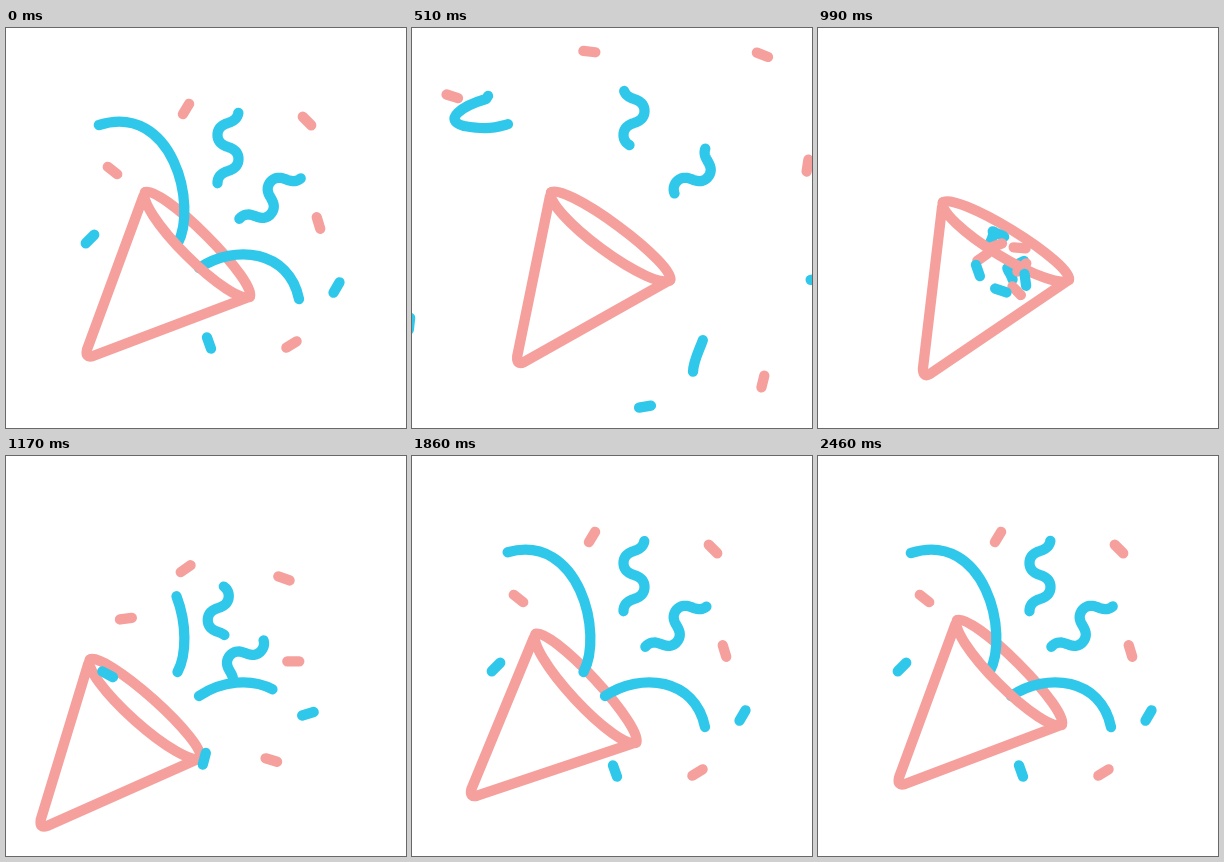
Write an HTML page that moves like this. It is 400 px wide and 400 px high and loops after 2.49 s.

```html
<!DOCTYPE html>
<html lang="en">
<head>
<meta charset="utf-8">
<title>Party popper</title>
<style>
html, body { margin: 0; width: 100%; height: 100%; overflow: hidden; background: #fff; }
svg { display: block; width: 100%; height: 100%; }
path { fill: none; stroke-width: 10.3; stroke-linecap: round; stroke-linejoin: round; }
.pink { stroke: #f5a09d; }
.blue { stroke: #2fc8eb; }
</style>
</head>
<body>
<svg viewBox="0 0 400 400">
  <g class="cone"><path class="pink" d="M139.2 164.2A74 13 45 0 1 243.8 268.8"/></g>
  <g id="streamers"></g>
  <g class="cone"><path class="pink" d="M139.2 164.2A74 16 45 0 0 243.8 268.8M137.5 168L81 321.5Q79 330.5 87 328L243 269"/></g>
  <g id="confetti"></g>
</svg>
<script>
const LOOP = 2490, STEP = 30;
const KICK = 930, BURST = 960;      // cone recoils, then a new burst leaves it
const ORIGIN = [178, 250];

const clamp = u => Math.max(0, Math.min(1, u));
const ease = u => 0.5 - 0.5 * Math.cos(Math.PI * clamp(u));
const mix = (a, b, u) => a + (b - a) * u;
const left = (t, span, power) => Math.pow(1 - clamp((t - BURST) / span), power);

function addPath(parent, color, d) {
  const p = document.createElementNS("http://www.w3.org/2000/svg", "path");
  p.setAttribute("class", color);
  p.setAttribute("d", d);
  return document.getElementById(parent).appendChild(p);
}

// A meander counted in half waves; 0 is a right-hand bend
function wave(x, y, angle, from, to) {
  const pts = [], c = Math.cos(angle), s = Math.sin(angle);
  for (let h = from; h <= to + 0.001; h += 0.05) {
    const a = h * Math.PI;
    const side = 10.5 * Math.cos(a), up = 24 * h + 1.9 * Math.sin(2 * a);
    pts.push((x + side * c + up * s).toFixed(2) + " " + (y + side * s - up * c).toFixed(2));
  }
  return "M" + pts.join("L");
}

// head: the part drawn by the burst; tail: the way it slips off.
// skip: share of head that is gone again at rest
function streamer(head, full, options) {
  const el = addPath("streamers", "blue", head);
  const rest = el.getTotalLength();
  el.setAttribute("d", full);
  return { el, rest, total: el.getTotalLength(), skip: 0, drift: 0, lag: 1, ...options };
}

function arc(head, tail, options) {
  return streamer(head, head + tail, options);
}

function squiggle(x, y, angle) {
  return streamer(wave(x, y, angle, -1.7, 1.95), wave(x, y, angle, -1.7, 3.45),
    { skip: 0.19, drift: 1, lag: 1.8, gone: 930, stretch: 750, power: 4.2 });
}

const streamers = [
  arc("M171.5 216C192 178 167 74 93 97", "C78 101 70 101 52 98C30 92 50 78 74 71C81 62 79 52 68 43",
    { gone: 930, stretch: 750, power: 3 }),
  arc("M193 240C229 216 283 222 293 271", "C296 287 296 300 289 317C285 327 281 335 281 345",
    { gone: 700, stretch: 560, power: 5 }),
  squiggle(222, 131, 0),
  squiggle(257, 179, 0.7)
];

// Colour, resting place and angle, flight and spin outwards, spin on arrival
const confetti = [
  ["pink", 180, 81, -59, -3, -65, -130, 41],
  ["pink", 301, 93, 45, 56, -75, 177, -43],
  ["pink", 106.5, 142.5, 38, -75, -84, -227, -78],
  ["pink", 312.5, 195, 73, 94, -65, -175, -124],
  ["pink", 285.5, 316.5, -32, 74, 42, 154, 83],
  ["blue", 84, 211, -45, -98, 96, 160, 124],
  ["blue", 203, 315, 70, 34, 72, -90, -247],
  ["blue", 330.5, 259.5, -60, 84, -9, 65, -233]
].map(bit => ({ bit, el: addPath("confetti", bit[0], "M-6 0H6") }));

const cones = document.querySelectorAll(".cone");

function drawCone(t) {
  const back = span => 1 - ease((t - 1050) / span);
  const kick = ease((t - KICK) / 180);
  const spin = mix(-14.3 * ease(t / 900), 8 * back(1250), ease((t - KICK) / 480));
  const x = -56.5 * kick * back(1250), y = 40 * kick * back(1350);
  cones.forEach(c => c.setAttribute("transform", `translate(${x} ${y}) rotate(${spin} 140 165)`));
}

function drawStreamer(s, t) {
  const start = s.rest * s.skip;
  let from, to, away = 0;
  if (t < BURST) {
    from = mix(start, s.total, Math.pow(ease(t / s.gone), s.lag));
    to = mix(s.rest, s.total, Math.pow(ease(t / s.stretch), s.lag));
  } else {
    from = start * ease((t - 1170) / 360);
    to = s.rest * (1 - left(t, 1200, s.power));
    away = s.drift * left(t, 900, 6.3);
  }
  s.el.setAttribute("visibility", to - from > 0.5 ? "visible" : "hidden");
  s.el.setAttribute("stroke-dasharray", `${Math.max(0, to - from)} 9999`);
  s.el.setAttribute("stroke-dashoffset", -from);
  s.el.setAttribute("transform", `translate(${-52 * away} ${48 * away})`);
}

function drawBit({ bit, el }, t) {
  let [, x, y, angle, dx, dy, spinOut, spinIn] = bit;
  if (t < BURST) {
    const s = 1 - Math.pow(1 - clamp(t / KICK), 2.7);
    x += dx * s;
    y += dy * s;
    angle += spinOut * s;
  } else {
    const away = left(t, 900, 6.3);
    x = mix(x, ORIGIN[0], away);
    y = mix(y, ORIGIN[1], away);
    angle += spinIn * left(t, 900, 2);
  }
  el.setAttribute("transform", `translate(${x} ${y}) rotate(${angle})`);
}

function draw(t) {
  drawCone(t);
  streamers.forEach(s => drawStreamer(s, t));
  confetti.forEach(c => drawBit(c, t));
}

const begin = performance.now();
function tick() {
  const t = (performance.now() - begin) % LOOP;
  draw(Math.floor(t / STEP) * STEP);
  requestAnimationFrame(tick);
}
tick();
</script>
</body>
</html>
```
